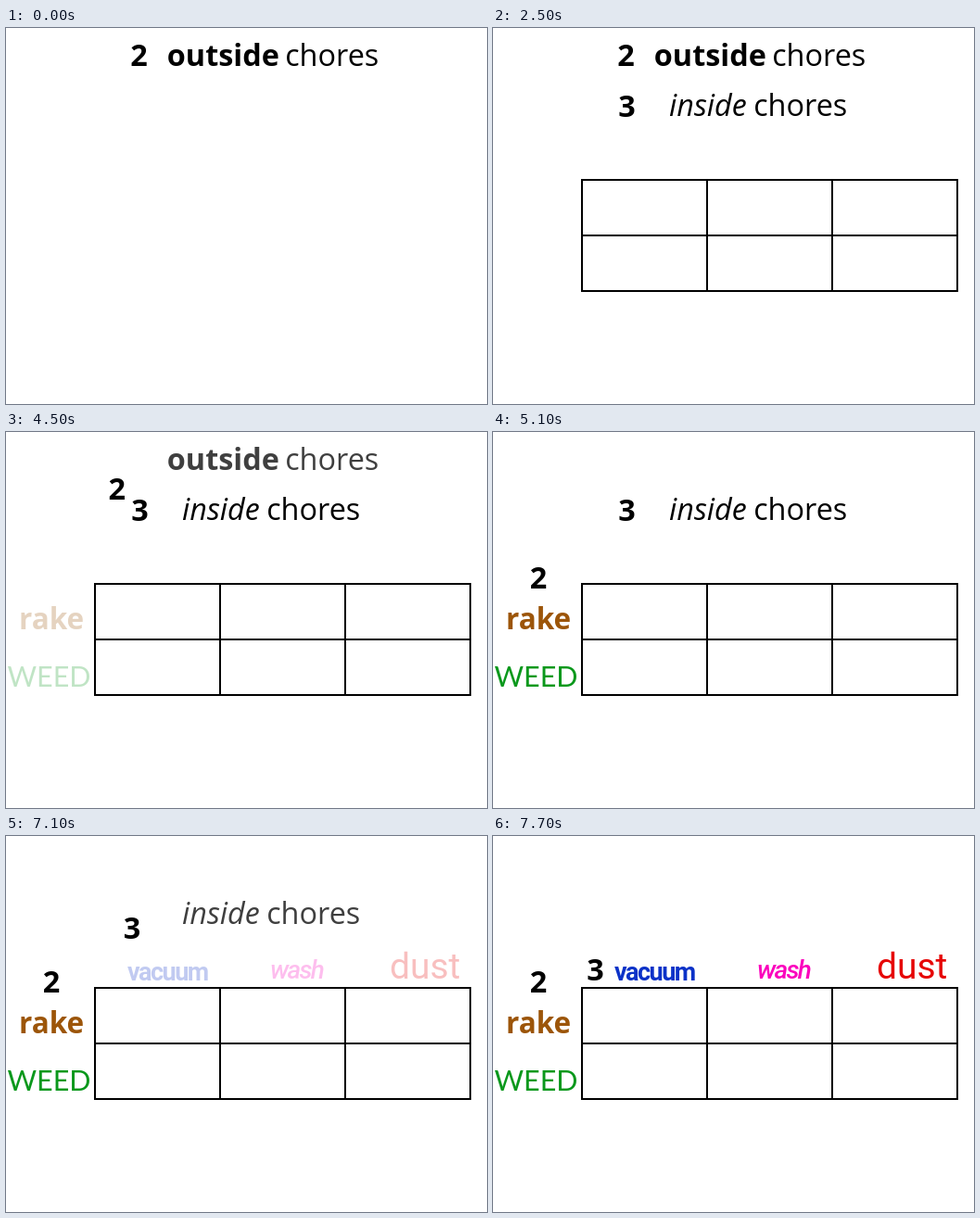
An HTML page for the animation above (8000 ms loop, 519x406 px).

```html
<!DOCTYPE html>
<html lang="en">
<head>
<meta charset="utf-8">
<title>Chores table</title>
<style>
  html, body { margin: 0; width: 100%; height: 100%; overflow: hidden; background: #fff; }
  svg { display: block; width: 519px; height: 406px; }
  text { font: 32.4px "Open Sans", "Noto Sans", sans-serif; white-space: pre; }
  .bold { font-weight: 700; }
  .italic { font-style: italic; }
  #rake { font-size: 31.5px; fill: #9c5509; }
  #weed { font: 30.5px Lato, sans-serif; fill: #0a981c; }
  #vacuum { font: 700 27px Roboto, sans-serif; letter-spacing: -1.5px; fill: #0b32c8; }
  #wash { font: italic 500 28px Roboto, sans-serif; letter-spacing: -1.7px; fill: #fb00bd; }
  #dust { font: 39px Roboto, sans-serif; fill: #e60606; }
</style>
</head>
<body>
<svg viewBox="0 0 519 406">
  <g id="outside">
    <text class="bold" x="173.8" y="41">outside</text>
    <text x="301.2" y="41">chores</text>
  </g>
  <g id="inside">
    <text class="italic" x="190" y="95">inside</text>
    <text x="281.2" y="95">chores</text>
  </g>
  <text id="two" class="bold">2</text>
  <text id="three" class="bold">3</text>
  <path id="grid" d="M96 164H501V284H96ZM96 224H501M231 164V284M366 164V284"
        fill="none" stroke="#000" stroke-width="2"/>
  <g id="rows">
    <text id="rake" class="bold" x="14" y="213">rake</text>
    <text id="weed" x="1.5" y="275">WEED</text>
  </g>
  <g id="columns">
    <text id="vacuum" x="131" y="156">vacuum</text>
    <text id="wash" x="285" y="154">wash</text>
    <text id="dust" x="414" y="154">dust</text>
  </g>
</svg>
<script>
const LOOP = 8000;
const el = id => document.getElementById(id);
const fade = (id, opacity) => el(id).setAttribute("opacity", opacity);

// Four hard steps of 200 ms; the first one is visible at the start time.
const steps = (t, start) =>
  Math.min(4, Math.max(0, Math.floor((t - start) / 200) + 1)) / 4;

function move(id, [x0, y0], [x1, y1], k) {
  el(id).setAttribute("x", x0 + (x1 - x0) * k);
  el(id).setAttribute("y", y0 + (y1 - y0) * k);
}

function draw(now) {
  const t = now % LOOP;
  const rows = steps(t, 4500);
  const columns = steps(t, 7100);

  move("two", [134.2, 41], [39.8, 169], rows);
  fade("outside", 1 - rows);
  fade("rows", rows);

  move("three", [135.3, 96], [101.3, 156], columns);
  fade("three", +(t >= 500));
  fade("inside", t < 500 ? 0 : 1 - columns);
  fade("columns", columns);

  fade("grid", +(t >= 2500));
}

let start;
function tick(now) {
  start ??= now;
  draw(now - start);
  requestAnimationFrame(tick);
}
draw(0);
requestAnimationFrame(tick);
</script>
</body>
</html>
```
